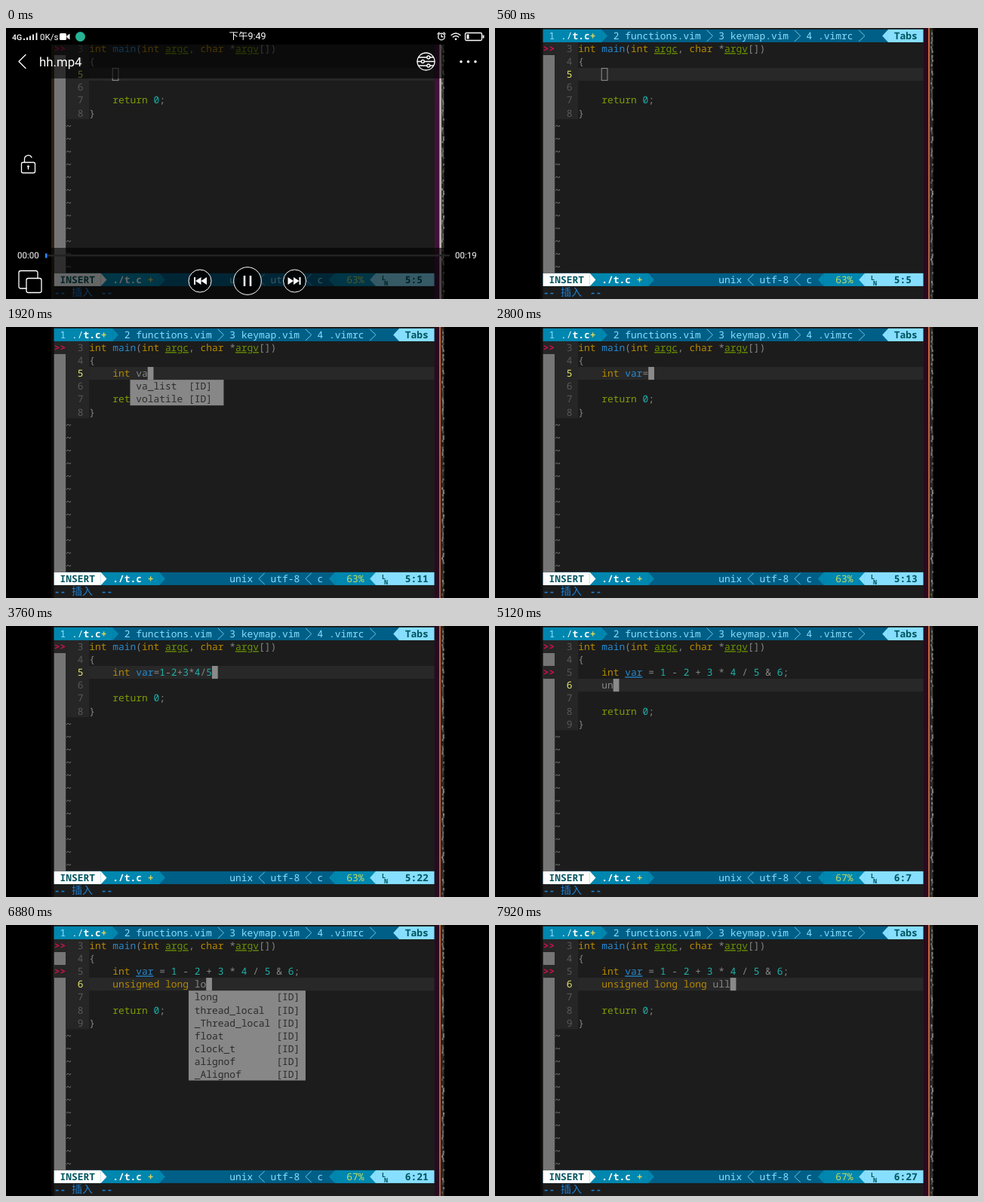
Animation, 640 px wide and 360 px high, one loop 8000 ms. Source, as an HTML page:

```html
<!DOCTYPE html>
<html lang="en">
<head>
<meta charset="utf-8">
<title>Typing in a terminal editor</title>
<style>
  html, body { margin: 0; width: 100%; height: 100%; overflow: hidden; background: #000; }
  svg { display: block; width: 640px; height: 360px; }
  text { white-space: pre; text-rendering: geometricPrecision; }
  .term text { font: 500 12.92px "Noto Sans Mono", "DejaVu Sans Mono", monospace; }
  .term .b { font-weight: 700; }
  .term .u { text-decoration: underline; }
  .term .cjk { font: 500 14px "Noto Sans CJK SC", "Noto Sans CJK", sans-serif; }
  .term .tiny { font: 700 8.5px "Noto Sans Mono", monospace; }
  #player text { font-family: Roboto, "Noto Sans CJK SC", "Noto Sans CJK", sans-serif; fill: #fff; }
  .line { fill: none; stroke: #fff; stroke-width: 1.3; stroke-linecap: round; stroke-linejoin: round; }
</style>
</head>
<body>
<svg viewBox="0 0 640 360">
  <defs>
    <linearGradient id="rim" x1="0" y1="0" x2="0" y2="1">
      <stop offset="0" stop-color="#c8683c"/>
      <stop offset=".5" stop-color="#b5613f"/>
      <stop offset="1" stop-color="#a8654c"/>
    </linearGradient>
  </defs>
  <rect width="640" height="360"/>
  <rect x="60" width="4" height="360" fill="#0e0a0a"/>
  <rect x="63.500" width="505" height="360" fill="#1c1c1c"/>
  <rect x="568" width="6" height="360" fill="#2b0a1f"/>
  <rect x="574" width="2.200" height="360" fill="url(#rim)"/>
  <rect x="576.500" width="4" height="360" fill="#2c2926"/>
  <g id="desk"></g>
  <g class="term" id="bars"></g>
  <g class="term" id="page"></g>

  <g id="player">
    <rect x="60" width="3.500" height="360" fill="#2a2110"/>
    <rect x="568" width="6" height="360" fill="#43103a"/>
    <rect x="574.500" width="2.500" height="360" fill="#b9b3b0"/>
    <rect width="640" height="22"/>
    <rect y="22" width="640" height="45" opacity=".6"/>
    <rect y="292" width="640" height="68" opacity=".6"/>

    <text x="8" y="16" font-size="10.500" font-weight="500">4G</text>
    <path d="M24 16v-2M28 16v-3.500M32 16v-5.500M36 16v-7.500M40.500 16v-9.500" stroke="#fff" stroke-width="1.800"/>
    <text x="45" y="15.500" font-size="11.500">0K/s</text>
    <rect x="71" y="7" width="9" height="9" rx="1.500" fill="#fff"/>
    <path d="M80.500 10.500l4-3v8l-4-3z" fill="#fff"/>
    <circle cx="98.500" cy="11.500" r="6.500" fill="#27b394"/>
    <text x="320" y="15" font-size="12.500" text-anchor="middle">下午9:49</text>
    <circle cx="577" cy="11.500" r="4.300" class="line"/>
    <path d="M577 9v2.700h2M572 8l2-2M582 8l-2-2" class="line"/>
    <path d="M590 9.500q6-5 12 0M592.300 12q3.700-3 7.400 0" class="line"/>
    <circle cx="596" cy="14.800" r="1.400" fill="#fff"/>
    <rect x="608.500" y="6.500" width="22" height="10" rx="1.500" class="line"/>
    <rect x="610.500" y="8.500" width="3" height="6" fill="#fff"/>
    <rect x="631.500" y="9.500" width="2" height="4" fill="#fff"/>

    <path d="M26 35.500l-9 9 9 9" class="line"/>
    <text x="44" y="50.800" font-size="16.800">hh.mp4</text>
    <circle cx="556.500" cy="44.500" r="11.500" class="line"/>
    <path d="M547 39h10.500M562 39h4M545 44.500h5M554.500 44.500h13M547 50h10.500M562 50h4" class="line"/>
    <circle cx="559.800" cy="39" r="2" class="line"/>
    <circle cx="552.300" cy="44.500" r="2" class="line"/>
    <circle cx="559.800" cy="50" r="2" class="line"/>
    <g fill="#fff"><circle cx="603" cy="44.800" r="1.800"/><circle cx="612.500" cy="44.800" r="1.800"/><circle cx="622" cy="44.800" r="1.800"/></g>

    <rect x="20.500" y="178.500" width="18" height="14" rx="2" class="line"/>
    <path d="M24.500 178v-4a5 5 0 0 1 9.500-2M29.500 184v3.500" class="line"/>
    <circle cx="29.500" cy="184" r="1.400" fill="#fff"/>

    <text x="15" y="306" font-size="11.500">00:00</text>
    <text x="595" y="306" font-size="11.500">00:19</text>
    <rect x="52" y="301" width="536" height="2.500" fill="#222"/>
    <rect x="52" y="299.500" width="2.500" height="6" fill="#2f86ff"/>

    <path d="M27 346h-7.500a2.500 2.500 0 0 1-2.500-2.500v-18.500a2.500 2.500 0 0 1 2.500-2.500h20a2.500 2.500 0 0 1 2.500 2.500v7.500" class="line"/>
    <rect x="27" y="332.500" width="20" height="19" rx="2.500" class="line"/>
    <g fill="#000" fill-opacity=".85" stroke="#fff">
      <circle cx="257" cy="336" r="15"/><circle cx="320" cy="336" r="18.300"/><circle cx="382.500" cy="336" r="15"/>
    </g>
    <path d="M316 329v14M324 329v14" stroke="#fff" stroke-width="2.500"/>
    <path id="skip" d="M249 331h2v10h-2zM251 336l7.500-5v10zM258.500 336l7.500-5v10z" fill="#fff"/>
    <use href="#skip" transform="translate(639.500 0) scale(-1 1)"/>
  </g>
</svg>

<script>
const LOOP = 8000, CW = 7.75, RH = 17.05, LEFT = 63.7, TOP = 1.9;
const C = {
  gray: '#858585', type: '#b58900', word: '#7f9c08', name: '#268bd2', num: '#1fb0a8', green: '#6b9400',
  sign: '#d0104c', dim: '#585858', now: '#e6e66a', line: '#282828', gutter: '#262626',
  deep: '#005f87', mid: '#0087af', pale: '#87dfff', ink: '#00555f', lime: '#c3dc60', plus: '#e0d85a', mode: '#1f7fd0'
};

const $ = id => document.getElementById(id);
const X = col => +(LEFT + col * CW).toFixed(2);
const Y = row => +(TOP + row * RH).toFixed(2);
const esc = s => s.replace(/&/g, '&amp;').replace(/</g, '&lt;').replace(/>/g, '&gt;');

const text = (col, row, s, fill, cls = '') =>
  `<text x="${X(col)}" y="${Y(row) + 13.3}" fill="${fill}" class="${cls}">${esc(s)}</text>`;
const box = (col, row, w, h, fill) =>
  `<rect x="${X(col)}" y="${Y(row)}" width="${w * CW}" height="${h * RH}" fill="${fill}"/>`;
const wedge = (col, row, dir, fill) => {
  const base = dir > 0 ? X(col) : X(col + 1);
  return `<path d="M${base} ${Y(row)}l${dir * CW} ${RH / 2}l${-dir * CW} ${RH / 2}z" fill="${fill}"/>`;
};
const chevron = (col, row, dir) => {
  const base = dir > 0 ? X(col) : X(col + 1);
  return `<path d="M${base} ${Y(row) + 1}l${dir * CW} ${RH / 2 - 1}l${-dir * CW} ${RH / 2 - 1}" fill="none" stroke="${C.pale}" stroke-opacity=".8"/>`;
};

// Speckled strip of desktop beside the window
function drawDesk() {
  let seed = 7, out = '';
  const rnd = () => (seed = seed * 16807 % 2147483647) / 2147483647;
  for (let y = 0; y < 360; y += 3) {
    const v = Math.round(30 + 110 * rnd());
    out += `<rect x="${577 + 2 * rnd()}" y="${y}" width="2" height="3" fill="rgb(${v},${v - 3},${v - 7})"/>`;
  }
  $('desk').innerHTML = out;
}

// Fixed parts of the tab line, status line and mode line
function drawBars() {
  const tabs = box(0, 0, 65, 1, C.deep) + box(0, 0, 10, 1, C.mid) + wedge(10, 0, 1, C.mid)
    + text(1, 0, '1', C.pale) + text(3, 0, './', '#e8f6fb') + text(5, 0, 't.c', '#fff', 'b') + text(8, 0, '+', C.plus, 'b')
    + text(12, 0, '2 functions.vim', C.pale) + chevron(28, 0, 1)
    + text(30, 0, '3 keymap.vim', C.pale) + chevron(43, 0, 1)
    + text(45, 0, '4 .vimrc', C.pale) + chevron(54, 0, 1)
    + wedge(58, 0, -1, C.pale) + box(59, 0, 6, 1, C.pale) + text(60, 0, 'Tabs', C.ink, 'b');
  const status = box(0, 19, 65, 1, C.deep) + box(0, 19, 18, 1, C.mid) + wedge(18, 19, 1, C.mid)
    + box(0, 19, 8, 1, '#fff') + wedge(8, 19, 1, '#fff') + text(1, 19, 'INSERT', C.ink, 'b')
    + text(10, 19, './t.c', '#fff', 'b') + text(16, 19, '+', C.plus, 'b')
    + text(30, 19, 'unix', C.pale) + chevron(35, 19, -1)
    + text(37, 19, 'utf-8', C.pale) + chevron(43, 19, -1) + text(45, 19, 'c', C.pale)
    + wedge(47, 19, -1, C.mid) + box(48, 19, 7, 1, C.mid)
    + wedge(54, 19, -1, C.pale) + box(55, 19, 10, 1, C.pale)
    + `<text class="tiny" x="498" y="334.500" fill="${C.ink}">L</text><text class="tiny" x="501" y="341.500" fill="${C.ink}">N</text>`;
  const mode = text(0, 20, '--', C.mode, 'b') + text(3, 20, '插入', C.mode, 'cjk') + text(8, 20, '--', C.mode, 'b');
  $('bars').innerHTML = tabs + status + mode;
}

const styles = [
  [/^(int|char|unsigned|long)$/, C.type], [/^return$/, C.word], [/^\d+$/, C.num],
  [/^(main|var)$/, C.name], [/^arg[cv]$/, C.green, 'u']
];
function code(row, line, warn) {
  return [...line.matchAll(/\w+|[^\w\s]+/g)].map(m => {
    const [, fill, cls] = styles.find(s => s[0].test(m[0])) || [0, C.gray];
    return text(6 + m.index, row, m[0], fill, warn && m[0] === 'var' ? 'u' : cls);
  }).join('');
}

function popup(col, row, words) {
  const wide = Math.max(...words.map(w => w.length)) + 1;
  return box(col - 1, row, Math.max(16, wide + 6), words.length, '#878787')
    + words.map((w, i) => text(col, row + i, w, '#2c2c2c') + text(col + wide, row + i, '[ID]', '#2c2c2c')).join('');
}

// Key presses: the text and the moment each character appears
const first = { keys: 'int var=1-2+3*4/5&6;',
  at: [960, 1120, 1280, 1440, 1680, 1840, 2160, 2720, 2880, 3040, 3120, 3280, 3360, 3440, 3520, 3600, 3680, 3920, 4080, 4320] };
const second = { keys: 'unsigned long long ull',
  at: [5040, 5120, 5200, 5360, 5440, 5520, 5680, 5760, 6000, 6160, 6240, 6320, 6400, 6560, 6720, 6800, 7040, 7120, 7280, 7520, 7680, 7840] };
const FORMAT = 4400, ENTER = 4880;
const typed = (run, t) => run.keys.slice(0, run.at.filter(a => a <= t).length);

const loWords = ['long', 'thread_local', '_Thread_local', 'float', 'clock_t', 'alignof', '_Alignof'];
function suggest(word) {
  if (word === 'va') return ['va_list', 'volatile'];
  if (word.length > 2 && 'unsigned'.startsWith(word)) return ['unsigned'];
  if (word === 'lo') return loWords;
  if (word === 'lon' || word === 'long') return ['long'];
  return null;
}

function drawPage(t) {
  const split = t >= ENTER;
  const one = t >= FORMAT ? 'int var = 1 - 2 + 3 * 4 / 5 & 6;' : typed(first, t);
  const two = typed(second, t);
  const pad = s => '    ' + s;
  const lines = ['int main(int argc, char *argv[])', '{', pad(one), split ? pad(two) : '', pad('return 0;'), '}'];
  if (split) lines.splice(4, 0, '');
  const here = split ? 4 : 3, now = lines[here - 1], n = lines.length;

  let out = box(0, 2, 2, 17, '#757575') + box(2, 1, 4, n, C.gutter) + box(6, here, 59, 1, C.line);
  for (const row of split ? [1, 3] : [1]) out += box(0, row, 2, 1, C.gutter) + text(0, row, '>>', C.sign, 'b');
  lines.forEach((s, i) => {
    const row = i + 1;
    out += text(4, row, String(i + 3), row === here ? C.now : C.dim) + code(row, s, split);
  });
  for (let row = n + 1; row < 19; row++) out += text(2, row, '~', '#777c7e');

  const end = 6 + now.length, word = now.match(/\w*$/)[0], list = suggest(word);
  if (list && (word !== 'va' || t >= 1920)) out += popup(end - word.length, here + 1, list);
  if (t < 960) {
    out += `<rect x="${X(end)}" y="${Y(here) + .5}" width="${CW}" height="${RH - 1}" fill="none" stroke="#909090"/>`;
  } else if (t >= 1280) {
    out += box(end, here, 1, 1, '#8a8a8a');
  }
  out += text(50, 19, Math.round((here + 2) / (n + 2) * 100) + '%', C.lime)
    + text(60, 19, `${here + 2}:${now.length + 1}`, C.ink, 'b');
  return out;
}

drawDesk();
drawBars();
const begin = performance.now();
let last = '';
function tick() {
  const t = (performance.now() - begin) % LOOP;
  const page = drawPage(t);
  if (page !== last) $('page').innerHTML = last = page;
  $('player').style.opacity = Math.max(0, Math.min(1, 1 - (t - 80) / 320));
  requestAnimationFrame(tick);
}
tick();
</script>
</body>
</html>
```
